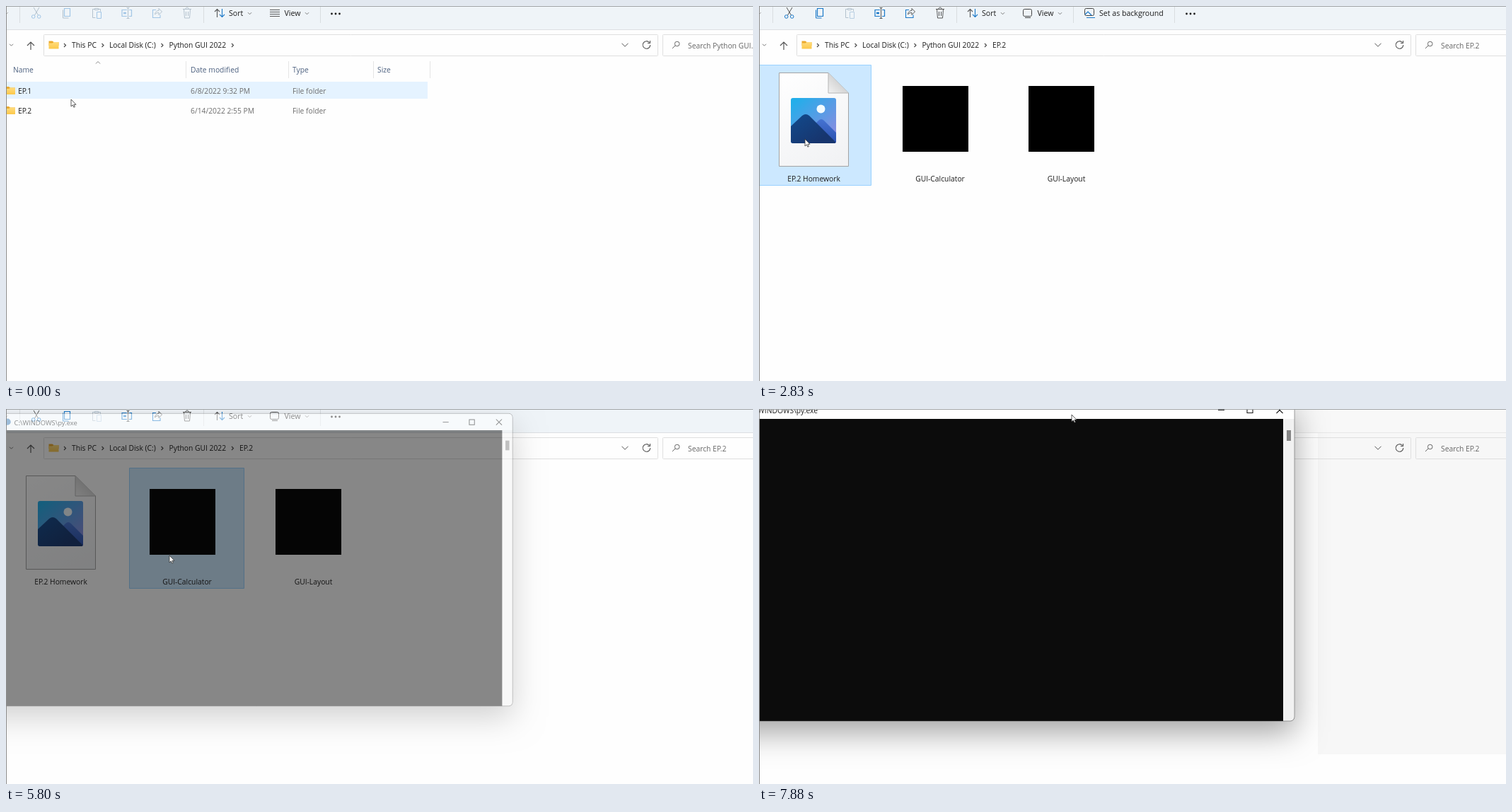
Write an HTML page with a canvas that moves like this. It is 1056x530 px and loops after 8000 ms.

```html
<!DOCTYPE html>
<html lang="en">
<head>
<meta charset="utf-8">
<title>Opening a calculator script</title>
<style>
html, body { margin: 0; width: 100%; height: 100%; overflow: hidden; background: #fefefe; }
canvas { display: block; }
</style>
</head>
<body>
<canvas id="stage" width="1056" height="530"></canvas>
<script>
const ctx = document.getElementById('stage').getContext('2d');
const LOOP = 8000, STEP = 120;
const FAMILY = '"Open Sans", "Noto Sans", sans-serif';
const UI = '10.3px ' + FAMILY, TOOL = '10.6px ' + FAMILY;
const INK = '#1c1c1c', BLUE = '#1a78c8';

// [start, number of steps]: the screen only refreshes at these moments
const BURSTS = [[0, 2], [520, 13], [2330, 1], [2830, 13], [5800, 16], [7880, 1]];
const CURSOR = [
  [0, 92, 132], [120, 99, 152], [520, 99, 152], [760, 101, 152], [1240, 222, 230],
  [1480, 195, 221], [1960, 64, 190], [2330, 64, 190], [2830, 65, 188], [3550, 237, 201],
  [4270, 231, 207], [5800, 231, 207], [6280, 380, 299], [6520, 306, 138], [6640, 301, 122],
  [7000, 410, 66], [7120, 472, 34], [7360, 436, 7], [7600, 442, 8], [8000, 442, 8]
];

function refreshTime(t) {
  const [start, count] = BURSTS.filter(b => b[0] <= t).pop();
  return start + Math.min(count - 1, Math.floor((t - start) / STEP)) * STEP;
}

function cursorAt(t) {
  const i = Math.max(1, CURSOR.findIndex(k => k[0] >= t));
  const [t0, x0, y0] = CURSOR[i - 1], [t1, x1, y1] = CURSOR[i];
  const p = (t - t0) / (t1 - t0);
  return [Math.round(x0 + (x1 - x0) * p), Math.round(y0 + (y1 - y0) * p)];
}

function rect(x, y, w, h, color) {
  ctx.fillStyle = color;
  ctx.fillRect(x, y, w, h);
}

function box(x, y, w, h, r, fill, edge) {
  ctx.beginPath();
  ctx.roundRect(x + .5, y + .5, w - 1, h - 1, r);
  if (fill) { ctx.fillStyle = fill; ctx.fill(); }
  if (edge) { ctx.strokeStyle = edge; ctx.lineWidth = 1; ctx.stroke(); }
}

function dot(x, y, r, color) {
  ctx.beginPath();
  ctx.arc(x, y, r, 0, 7);
  ctx.fillStyle = color;
  ctx.fill();
}

function stroke(d, color, width = 1) {
  ctx.strokeStyle = color;
  ctx.lineWidth = width;
  ctx.stroke(new Path2D(d));
}

function fill(d, color) {
  ctx.fillStyle = color;
  ctx.fill(new Path2D(d));
}

function text(s, x, y, color = INK, align = 'left', font = UI) {
  ctx.font = font;
  ctx.textAlign = align;
  ctx.fillStyle = color;
  ctx.fillText(s, x, y);
}

function gradient(x0, y0, x1, y1, a, b) {
  const g = ctx.createLinearGradient(x0, y0, x1, y1);
  g.addColorStop(0, a);
  g.addColorStop(1, b);
  return g;
}

const chevronDown = (x, y, s, color) => stroke(`M${x - s} ${y - s / 2}l${s} ${s} ${s} ${-s}`, color);

function folder(x, y) {
  fill(`M${x} ${y}h5l2 1.500h7v5h-14z`, '#eba92c');
  fill(`M${x} ${y + 3}h5l2-1.500h7v9.500h-14z`, gradient(0, y, 0, y + 11, '#ffdf86', '#fcc84a'));
}

function captionButtons(xs, y, color) {
  const [min, max, close] = xs;
  stroke(`M${min - 4.5} ${y + .5}h9`, color);
  stroke(`M${max - 4} ${y - 3.5}h8v8h-8z`, color, 1.1);
  stroke(`M${close - 4.5} ${y - 4}l9 9m0-9l-9 9`, color, 1.1);
}

function toolbar(list, on, background) {
  const grey = on ? '#555' : '#b4c2ce', blue = on ? BLUE : '#a2c6e6';
  const pale = list || !on ? '#a2c6e6' : '#b9cfe2';
  const label = (s, x) => text(s, x, 14, INK, 'left', TOOL);
  stroke('M0 12l3-3', '#b0b0b0');
  for (const x of [19, 279, 444, ...(background ? [587] : [])]) rect(x, 1, 1, 23, '#d9dde0');

  stroke('M39 2l6.500 11M47 2l-6.500 11', grey);
  stroke('M41 15a2.300 2.300 0 1 1-4.600 0a2.300 2.300 0 1 1 4.600 0M49 15a2.300 2.300 0 1 1-4.600 0a2.300 2.300 0 1 1 4.600 0', blue);
  stroke('M82.500 3.500h8v11h-8z', blue, 1.2);
  stroke('M80.500 5.500v11.500h8', on ? blue : grey);
  stroke('M125 4.500h-2.500v12h4M131 4.500h2.500v3M125.500 3.500h5v2h-5z', '#b4c2ce');
  stroke('M128.500 8.500h6v9h-6z', pale);
  stroke('M171 5.500h-7v9h7M174 5.500h3.500v9h-3.500', blue, 1.2);
  stroke('M172.500 3v14M170.500 2.500h4M170.500 17.500h4', grey);
  stroke('M166 10h4', blue, 2.5);
  stroke('M212 5.500h-4.500v11h10.500v-4', blue, 1.1);
  stroke('M210.500 12c.5-4 3-5.500 5.500-5.500v-3l4.500 4.500-4.500 4.500v-3c-2.500 0-4 .5-5.500 2.500z', grey);
  stroke('M250 4.500h12M251.500 4.500l1 12.500h7l1-12.500M254 4c0-2.500 4-2.500 4 0M254.500 8v6M257.500 8v6', grey);

  stroke('M298.500 16V4.500M295 8l3.500-3.500 3.500 3.500', '#555', 1.1);
  stroke('M305.500 4v11.500M302 12l3.500 3.500 3.500-3.500', BLUE, 1.1);
  label('Sort', 315);
  chevronDown(344.5, 10.5, 2.5, '#777');
  if (list) stroke('M373 5.500h14M373 8.500h14M373 11.500h14M373 14.500h14', '#555');
  else {
    box(373, 4, 13, 11, 2, null, '#444');
    stroke('M376 16.500h8', '#444');
  }
  label('View', 393.5);
  chevronDown(425.5, 10.5, 2.5, '#777');
  if (background) {
    box(460, 3, 14, 11, 2, null, '#444');
    stroke('M461 12l4-4 5 5M463 16.500h12', BLUE, 1.2);
    label('Set as background', 481);
  }
  const more = background ? 610 : 466;
  for (const dx of [-5.5, 0, 5.5]) dot(more + dx, 11, 1.4, INK);
}

function addressBar(list) {
  box(53, 40, 869, 31, 1, null, '#dfdfdf');
  box(928, 40, 140, 31, 1, null, '#dfdfdf');
  chevronDown(7.5, 55, 2.5, '#777');
  stroke('M35 62v-11M30 56l5-5 5 5', '#555', 1.2);
  folder(60.5, 49.5);
  const crumbs = [['This PC', 93], ['Local Disk (C:)', 146], ['Python GUI 2022', 230.5]];
  if (!list) crumbs.push(['EP.2', 330]);
  for (const [name, x] of crumbs) text(name, x, 59);
  for (const x of [82, 135.5, 219.5, 319]) stroke(`M${x} 53l2.500 2.500-2.500 2.500`, '#444', 1.1);
  chevronDown(875, 55, 4.5, '#555');
  stroke('M909.500 51.500a5.300 5.300 0 1 0 1.300 3.500M910.500 49v3.500h-3.500', '#555', 1.1);
  stroke('M952 53.500a3.300 3.300 0 1 1-6.600 0a3.300 3.300 0 1 1 6.600 0M946 56l-4 4', '#666');
  text(list ? 'Search Python GUI...' : 'Search EP.2', 964, 59.5, '#666');
}

function folderList(t, pointerY) {
  const heads = [['Name', 10], ['Date modified', 261], ['Type', 405], ['Size', 525]];
  for (const [name, x] of heads) text(name, x, 94, '#4c607f');
  for (const x of [254, 399, 519, 599]) rect(x, 78, 1, 24, '#e5e5e5');
  stroke('M127 81.500l3-3 3 3', '#888');
  const rows = [['EP.1', '6/8/2022 9:32 PM', 107], ['EP.2', '6/14/2022 2:55 PM', 135]];
  rows.forEach(([name, date, y], i) => {
    if (i === (pointerY > 135 ? 1 : 0)) rect(1, y, 595, 24, i && t >= 520 ? '#cce8ff' : '#e5f3ff');
    folder(-1, y + 7);
    text(name, 17, y + 17);
    text(date, 261, y + 17, '#6d6d6d');
    text('File folder', 405, y + 17, '#6d6d6d');
  });
}

function pictureFile() {
  const page = 'M28.500 94.500H98L126.500 123V226.500H28.500z';
  fill(page, gradient(28, 94, 110, 227, '#ffffff', '#f1f2f4'));
  stroke(page, '#a3a3a3');
  fill('M98 94.500L126.500 123H98z', gradient(98, 123, 114, 107, '#f2f2f2', '#d2d2d2'));
  stroke('M98 94.500V123H126.500', '#b5b5b5');
  ctx.save();
  ctx.beginPath();
  ctx.roundRect(45, 130, 64, 64, 3);
  ctx.clip();
  rect(45, 130, 64, 64, gradient(55, 130, 105, 185, '#22aeea', '#8a8be0'));
  dot(87.5, 145.5, 6, '#f2fbff');
  fill('M66 194V180L84 162Q88 158 92 162L109 179V194z', gradient(0, 160, 0, 194, '#4573d2', '#2a4fae'));
  fill('M45 170L61 155Q66 151 71 155L109 193V194H45z', gradient(50, 152, 80, 194, '#124a8c', '#17356e'));
  ctx.restore();
}

function iconView(t, x) {
  const selected = t < 2330 ? -1 : t < 3910 ? 0 : 1;
  const hovered = x < 159 ? 0 : x >= 174 && x < 337 ? 1 : -1;
  [[0, 159], [174, 163]].forEach(([left, w], i) => {
    if (i === selected) box(left, 83, w, 171, 0, '#cce8ff', '#99d1ff');
    else if (i === hovered && t < 5800) rect(left, 83, w, 171, '#e5f3ff');
  });
  pictureFile();
  for (const left of [203, 381]) rect(left, 113, 93, 93, '#000');
  text('EP.2 Homework', 77.5, 248, INK, 'center');
  text('GUI-Calculator', 256, 248, INK, 'center');
  text('GUI-Layout', 434.5, 248, INK, 'center');
}

function explorer(t, x, y) {
  const list = t < 880, shaded = t >= 6160;
  rect(0, 0, 1056, 530, '#fefefe');
  rect(0, 0, 1056, 33, shaded ? '#f8f8f8' : '#eff4f8');
  if (shaded) {
    const left = t >= 7880 ? 790 : 0;
    rect(left, 34, 1056 - left, 454, '#f7f7f7');
  }
  rect(0, 33, 1056, 1, shaded ? '#e8e8e8' : '#dcdfe2');
  toolbar(list, list ? t >= 520 : t >= 2330, t >= 2330 && t < 3910);
  addressBar(list);
  if (list) folderList(t, y);
  else iconView(t, x);
}

// Runs a drawing inside a rounded window with a shadow that stays outside it
function windowFrame(x, y, w, h, shadow, content) {
  const [blur, drop, dark] = shadow;
  const shape = new Path2D();
  shape.roundRect(x, y, w, h, 6);
  const outside = new Path2D(shape);
  outside.rect(-600, -600, 2400, 2000);
  ctx.save();
  ctx.clip(outside, 'evenodd');
  ctx.shadowColor = `rgba(0,0,0,${dark})`;
  ctx.shadowBlur = blur;
  ctx.shadowOffsetY = drop;
  ctx.fillStyle = '#000';
  ctx.fill(shape);
  ctx.restore();
  ctx.save();
  ctx.clip(shape);
  content();
  ctx.restore();
  ctx.strokeStyle = 'rgba(60,60,60,.45)';
  ctx.lineWidth = 1;
  ctx.stroke(shape);
}

// Windows fade in while growing from a slightly smaller size
function opening(alpha, scale, cx, cy, draw) {
  ctx.save();
  ctx.globalAlpha = alpha;
  ctx.translate(cx, cy);
  ctx.scale(scale, scale);
  ctx.translate(-cx, -cy);
  draw();
  ctx.restore();
}

function consoleWindow(active) {
  windowFrame(-183, -12, 940, 453, active ? [44, 16, .36] : [34, 12, .2], () => {
    rect(-183, -12, 940, 26, active ? '#ffffff' : '#f8f8f8');
    rect(-183, 14, 924, 427, '#0c0c0c');
    rect(741, 14, 16, 427, '#f1f1f1');
    rect(746, 30, 6, 15, '#858585');
    dot(-25, 1, 5, '#3f7cb5');
    const color = active ? INK : '#999';
    text('C:\\WINDOWS\\py.exe', 83, 6, color, 'right');
    captionButtons([653.5, 694, 736], 1, color);
  });
}

function calculatorWindow() {
  windowFrame(6.5, 36.5, 444.5, 292.5, [30, 12, .4], () => {
    rect(6, 36, 446, 294, '#f8f8f8');
    dot(20.5, 48.5, 4.5, '#2f4f6e');
    text('GUI-Calculator', 31, 53);
    captionButtons([347.5, 388.5, 430.5], 48, INK);
    text('Tuna Fish Weight <Kilograms>', 229, 93, INK, 'center', '19.3px "Liberation Serif", serif');
    box(132, 125, 193, 49, 2, '#fafafa', '#e2e2e2');
    rect(133, 173, 191, 1, '#868686');
    box(155, 192, 148, 74, 2, '#f8f8f8', '#cfcfcf');
    text('Calculate price', 229, 233, INK, 'center');
  });
}

function pointer(x, y) {
  const arrow = 'M0 0V10L2.300 7.900L3.900 11.200L5.400 10.500L3.900 7.300H7z';
  ctx.save();
  ctx.translate(x, y);
  fill(arrow, '#fff');
  stroke(arrow, '#333', .8);
  ctx.restore();
}

function draw(time) {
  const t = refreshTime(time);
  const [x, y] = cursorAt(t);
  explorer(t, x, y);
  if (t >= 5800) {
    const p = Math.min(1, (t - 5800) / 240);
    const ease = 1 - (1 - p) ** 2;
    opening(.49 + .51 * ease, .913 + .087 * ease, 287, 198, () => consoleWindow(t < 6160 || t >= 7880));
  }
  if (t >= 6160 && t < 7880) {
    const start = t < 6280;
    opening(start ? .6 : 1, start ? .95 : 1, 229, 183, calculatorWindow);
  }
  rect(0, 0, 1056, 1, '#a0a4a6');
  rect(0, 0, 1, 530, '#8c8c8c');
  pointer(x, y);
}

const begin = performance.now();
function frame() {
  draw((performance.now() - begin) % LOOP);
  requestAnimationFrame(frame);
}
frame();
</script>
</body>
</html>
```
